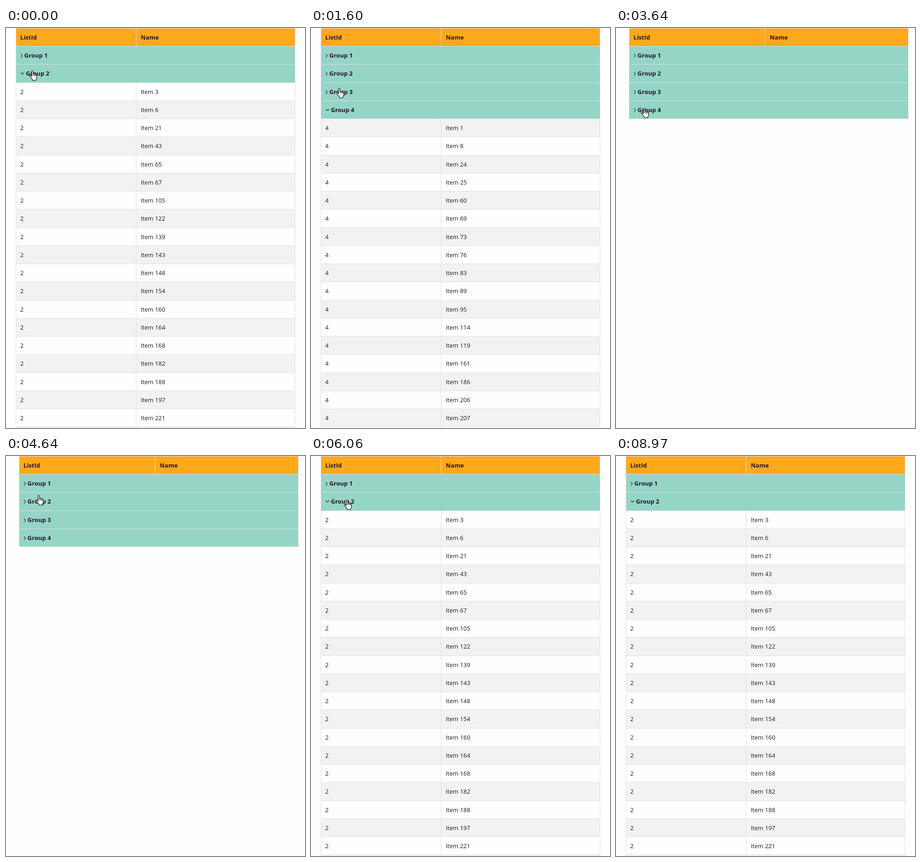
Write an HTML page that moves like this. It is 647 px wide and 866 px high and loops after 9280 ms.

```html
<!DOCTYPE html>
<html lang="en">
<head>
<meta charset="utf-8">
<title>Grouped list</title>
<style>
html, body { margin: 0; width: 100%; height: 100%; overflow: hidden; background: #fefefe; }
svg { position: absolute; left: 0; top: 0; }
text { font: 12.9px "Open Sans", "Noto Sans", sans-serif; fill: #26142f; }
.b { font-weight: 700; font-size: 13px; }
rect { shape-rendering: crispEdges; }
.chev { fill: none; stroke: #26142f; stroke-width: 1.1; }
.cursor { fill: #fff; stroke: #000; stroke-width: 1.1; stroke-linejoin: round; stroke-linecap: round; }
</style>
</head>
<body>
<svg width="647" height="866">
  <g id="table"></g>
  <g id="hand" class="cursor">
    <path d="M5.5 13V2.3Q5.5.8 7 .8Q8.5.8 8.5 2.3V7.4Q9 6.6 10 6.7Q11.3 6.8 11.5 8Q12.2 7.3 13.1 7.6Q14.1 7.9 14.2 9Q14.9 8.4 15.7 8.9Q16.5 9.4 16.5 10.6V15Q16.5 17.4 14.8 19.4V21.5H7.4V19.6Q5.4 17.7 4 15.2L1 11.8Q.4 10.4 1.6 9.9Q2.7 9.5 3.8 10.8Z"/>
    <path d="M8.5 7.4V11.5M11.5 8V11.8M14.2 9V12" fill="none"/>
  </g>
  <path id="arrow" class="cursor" d="M.6.9V16.2L4.1 12.9L6.4 18.2L8.8 17.2L6.5 12H11.4Z"/>
</svg>
<script type="module">
const LOOP = 9280, PITCH = 39.24, ROWS = 23;
const LINE = "#dee0e2", TEAL = "#95d5c5", ORANGE = "#fda91b", GREY = "#f2f2f2", WHITE = "#fefefe";
const ARROW_FROM = 8140, GONE_FROM = 8970;

const items = {
  2: "3 6 21 43 65 67 105 122 139 143 148 154 160 164 168 182 188 197 221",
  3: "5 12 19 26 27 32 47 68 71 74 75 99 102 132 137 151 176 192",
  4: "1 8 24 25 60 69 73 76 83 89 95 114 119 161 186 206 207"
};

// Start time and open group; 0 means everything is collapsed
const views = [[0, 2], [570, 3], [1600, 4], [3640, 0], [6060, 2]];

// Cursor glides: first step at `from`, last at `to`, ending on x, y
const glides = [
  { from: 0, to: 0, steps: 1, x: 50, y: 92 },
  { from: 140, to: 140, steps: 1, x: 51, y: 92 },
  { from: 850, to: 1150, steps: 3, x: 54, y: 129.5 },
  { from: 2170, to: 2540, steps: 4, x: 54, y: 173 },
  { from: 4090, to: 4350, steps: 3, x: 63.5, y: 87 },
  { from: 4640, to: 4640, steps: 1, x: 64, y: 84.5 },
  { from: 4780, to: 4930, steps: 2, x: 65, y: 65 },
  { from: 5210, to: 5650, steps: 4, x: 71, y: 94.5 },
  { from: 8140, to: 8140, steps: 1, x: 611, y: 586 },
  { from: 8280, to: 8280, steps: 1, x: 630, y: 617 },
  { from: 8420, to: 8680, steps: 3, x: 614, y: 846 },
  { from: 8820, to: 8820, steps: 1, x: 623, y: 862 }
];

const rowTop = row => Math.round(row * PITCH);
const easeOut = p => 1 - (1 - p) ** 1.3;
const box = (x, y, w, h, fill) => `<rect x="${x}" y="${y}" width="${w}" height="${h}" fill="${fill}"/>`;
const label = (x, row, s, cls = "") => `<text x="${x}" y="${rowTop(row) + 25}" class="${cls}">${s}</text>`;

function drawTable(open) {
  const left = open ? 21 : 28, mid = open ? 281 : 322, width = 605;
  const groups = open || 4, rows = open ? ROWS : groups + 1;
  const names = open ? items[open].split(" ") : [];
  let out = "";
  for (let row = 0; row < rows; row++) {
    const y = rowTop(row), h = rowTop(row + 1) - y;
    const isGroup = row > 0 && row <= groups;
    const striped = row % 2 === (open === 2 ? 0 : 1);
    const fill = !row ? ORANGE : isGroup ? TEAL : striped ? GREY : WHITE;
    out += box(left, y, width, h, fill) + box(left, y, width, 1, LINE);
    if (!isGroup) out += box(mid, y, 1, h, LINE);
    if (!row) {
      out += label(left + 9.8, 0, "ListId", "b") + label(mid + 10.8, 0, "Name", "b");
    } else if (isGroup) {
      const isOpen = row === open;
      const chevron = isOpen ? `M${left + 11} ${y + 18.5}l3.5 3.5l3.5 -3.5` : `M${left + 10.8} ${y + 17}l3.6 4l-3.6 4`;
      out += `<path class="chev" d="${chevron}"/>` + label(left + (isOpen ? 22 : 18.6), row, "Group " + row, "b");
    } else {
      const name = names[row - groups - 1];
      if (name) out += label(left + 9.7, row, open) + label(mid + 10.7, row, "Item " + name);
    }
  }
  const end = rowTop(rows);
  out += box(left, end, width, 1, LINE);
  out += box(left, 0, 1, end, LINE) + box(left + width - 1, 0, 1, end + 1, LINE);
  table.innerHTML = out;
}

function cursorAt(t) {
  const i = glides.findLastIndex(g => g.from <= t);
  const { from, to, steps, x, y } = glides[i], start = glides[Math.max(i - 1, 0)];
  const step = t >= to ? steps : 1 + Math.floor((t - from) / (to - from) * (steps - 1));
  const p = easeOut(step / steps);
  return [start.x + (x - start.x) * p, start.y + (y - start.y) * p];
}

const [table, hand, arrow] = ["table", "hand", "arrow"].map(id => document.getElementById(id));
let shown;

function frame() {
  const t = performance.now() % LOOP;
  const open = views.findLast(v => v[0] <= t)[1];
  if (open !== shown) drawTable(shown = open);
  const cursor = t >= GONE_FROM ? null : t >= ARROW_FROM ? arrow : hand;
  for (const c of [hand, arrow]) c.style.display = c === cursor ? "" : "none";
  cursor?.setAttribute("transform", `translate(${cursorAt(t)})`);
  requestAnimationFrame(frame);
}
frame();
</script>
</body>
</html>
```
